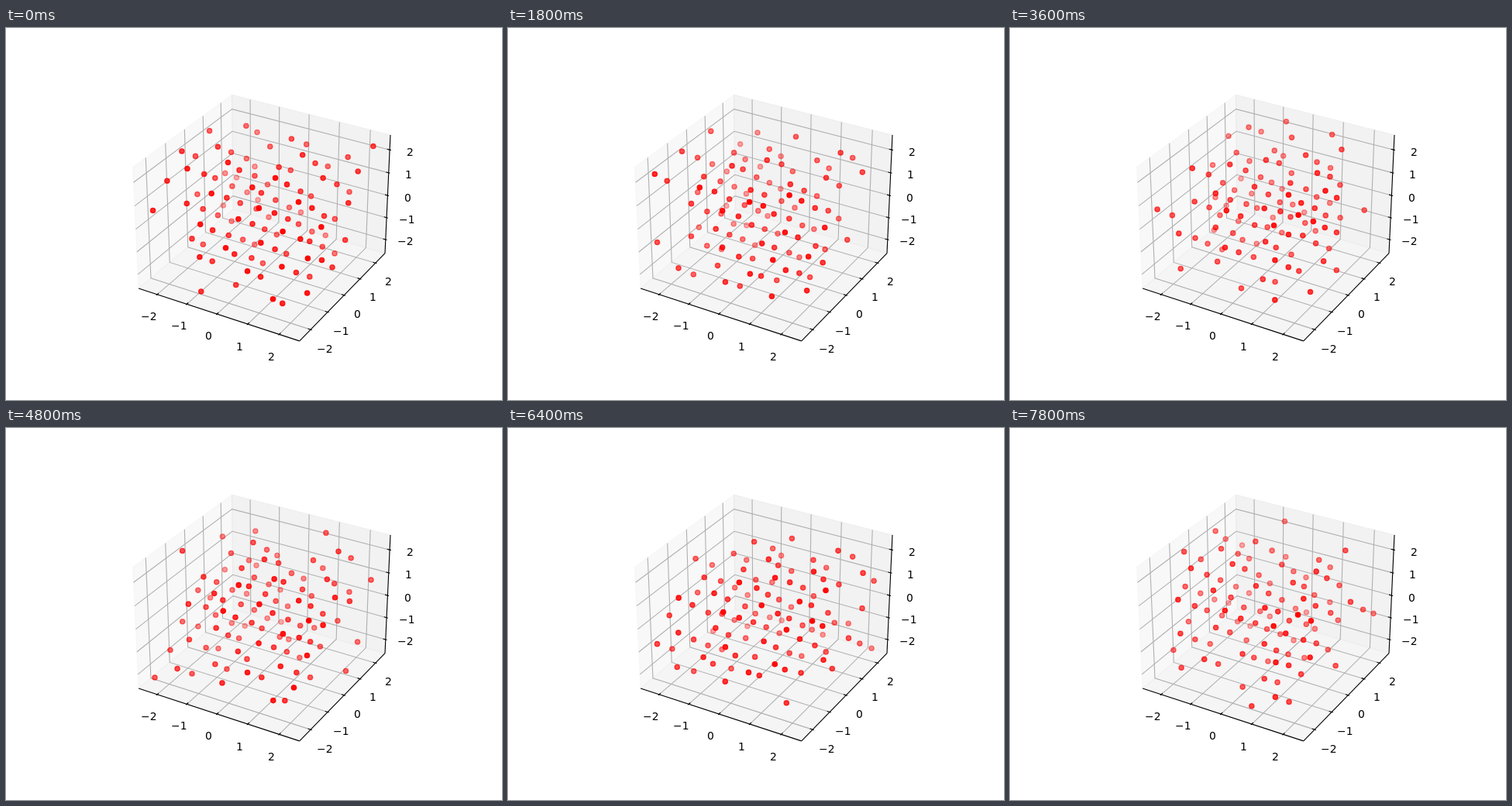
Animation of 640 by 480 pixels, one loop 8 s. Source, as an HTML page with a canvas:

```html
<!DOCTYPE html>
<html lang="en">
<head>
<meta charset="utf-8">
<title>Vibrating crystal</title>
<style>
  html, body { margin: 0; width: 100%; height: 100%; overflow: hidden; background: #fff; }
  canvas { display: block; }
</style>
</head>
<body>
<canvas id="stage" width="640" height="480"></canvas>
<script>
const ctx = document.getElementById('stage').getContext('2d');

const STEP_MS = 200, STEPS = 40;
const BOX = 4.6;                // edge of the periodic box
const CELLS = 6;                // half lattice constants per edge
const JITTER = 0.09;            // twice the standard deviation of the vibration
const LIMIT = BOX * 0.55;       // axis limits with a 5 % margin
const EDGE = LIMIT * 25 / 24;   // panes lie slightly outside the limits
const TICK = LIMIT / 6;
const TICKS = [-2, -1, 0, 1, 2];
const LINE = 1.11;

// Perspective view: elevation 30°, azimuth -60°, distance 10.
const SIN60 = Math.sqrt(3) / 2;
function project([x, y, z]) {
  const a = x / EDGE * 0.5952, b = y / EDGE * 0.5952, c = z / EDGE * 0.4464;
  const right = SIN60 * a + b / 2;
  const up = -a / 4 + SIN60 / 2 * b + SIN60 * c;
  const distance = 10 - (SIN60 / 2 * a - 0.75 * b + c / 2);
  const scale = 1997.84 / distance;
  return [333 + right * scale, 237.4 - up * scale, distance];
}

function trace(points) {
  ctx.beginPath();
  for (const p of points) {
    const [x, y] = project(p);
    ctx.lineTo(x, y);
  }
}

function line(color, ...points) {
  trace(points);
  ctx.strokeStyle = color;
  ctx.lineWidth = LINE;
  ctx.stroke();
}

function pane(color, ...points) {
  trace(points);
  ctx.closePath();
  ctx.fillStyle = ctx.strokeStyle = color;
  ctx.lineWidth = LINE;
  ctx.fill();
  ctx.stroke();
}

// Centred text that starts on a whole pixel.
function label(value, point) {
  const [x, y] = project(point);
  const text = String(value).replace('-', '\u2212');
  ctx.fillStyle = '#000';
  ctx.fillText(text, Math.round(x - ctx.measureText(text).width / 2), Math.round(y) + 11);
}

// Each axis: grid line, outer edge, tick mark and label position for a value t.
const E = EDGE, OUT = E + TICK * 0.1, IN = E - TICK * 0.2, FAR = E + TICK * 1.037;
const AXES = [
  { grid: t => [[t, -E, -E], [t, E, -E], [t, E, E]],
    edge: [[-E, -E, -E], [E, -E, -E]],
    tick: t => [[t, -OUT, -E], [t, -IN, -E]],
    text: t => [t, -FAR, -FAR] },
  { grid: t => [[E, t, -E], [-E, t, -E], [-E, t, E]],
    edge: [[E, -E, -E], [E, E, -E]],
    tick: t => [[OUT, t, -E], [IN, t, -E]],
    text: t => [FAR, t, -FAR] },
  { grid: t => [[-E, -E, t], [-E, E, t], [E, E, t]],
    edge: [[E, E, -E], [E, E, E]],
    tick: t => [[OUT, E, t], [IN, E, t]],
    text: t => [FAR, FAR, t] }
];

function drawAxes() {
  ctx.fillStyle = '#fff';
  ctx.fillRect(0, 0, 640, 480);
  pane('rgba(242,242,242,.5)', [-E, -E, -E], [-E, E, -E], [-E, E, E], [-E, -E, E]);
  pane('rgba(230,230,230,.5)', [-E, E, -E], [E, E, -E], [E, E, E], [-E, E, E]);
  pane('rgba(236,236,236,.5)', [-E, -E, -E], [E, -E, -E], [E, E, -E], [-E, E, -E]);
  ctx.font = '13.89px "DejaVu Sans", sans-serif';
  for (const axis of AXES) {
    for (const t of TICKS) line('#b0b0b0', ...axis.grid(t));
    line('#000', ...axis.edge);
    for (const t of TICKS) {
      line('#000', ...axis.tick(t));
      label(t, axis.text(t));
    }
  }
}

// Face-centred cubic lattice: every second node of a 6 x 6 x 6 grid.
const sites = [];
for (let i = 0; i < CELLS; i++)
  for (let j = 0; j < CELLS; j++)
    for (let k = 0; k < CELLS; k++)
      if ((i + j + k) % 2 === 0) sites.push([i, j, k]);

function seeded(seed) {
  return () => {
    seed = (seed + 0x6D2B79F5) | 0;
    let n = Math.imul(seed ^ seed >>> 15, 1 | seed);
    n = n + Math.imul(n ^ n >>> 7, 61 | n) ^ n;
    return ((n ^ n >>> 14) >>> 0) / 4294967296;
  };
}

function drawAtoms(step) {
  const random = seeded(step * 7919 + 17);
  // Thermal displacement; atoms leaving one face re-enter at the opposite one.
  const vibrate = node => {
    const shift = (random() + random() + random() - 1.5) * JITTER;
    const place = node * BOX / CELLS + shift;
    return (place + BOX) % BOX - BOX / 2;
  };
  const atoms = sites.map(site => project(site.map(vibrate)));
  atoms.sort((p, q) => q[2] - p[2]);
  const far = 1 / atoms[0][2], near = 1 / atoms[atoms.length - 1][2];
  ctx.lineWidth = 1.39;
  for (const [x, y, distance] of atoms) {
    const alpha = 0.3 + 0.7 * (1 / distance - far) / (near - far);
    ctx.fillStyle = ctx.strokeStyle = `rgba(255,0,0,${alpha})`;
    ctx.beginPath();
    ctx.arc(x, y, 3.1, 0, 2 * Math.PI);
    ctx.fill();
    ctx.stroke();
  }
}

let shown = -1;
function play() {
  const step = Math.floor(performance.now() / STEP_MS) % STEPS;
  if (step !== shown) {
    drawAxes();
    drawAtoms(step);
    shown = step;
  }
  requestAnimationFrame(play);
}
play();
</script>
</body>
</html>
```
